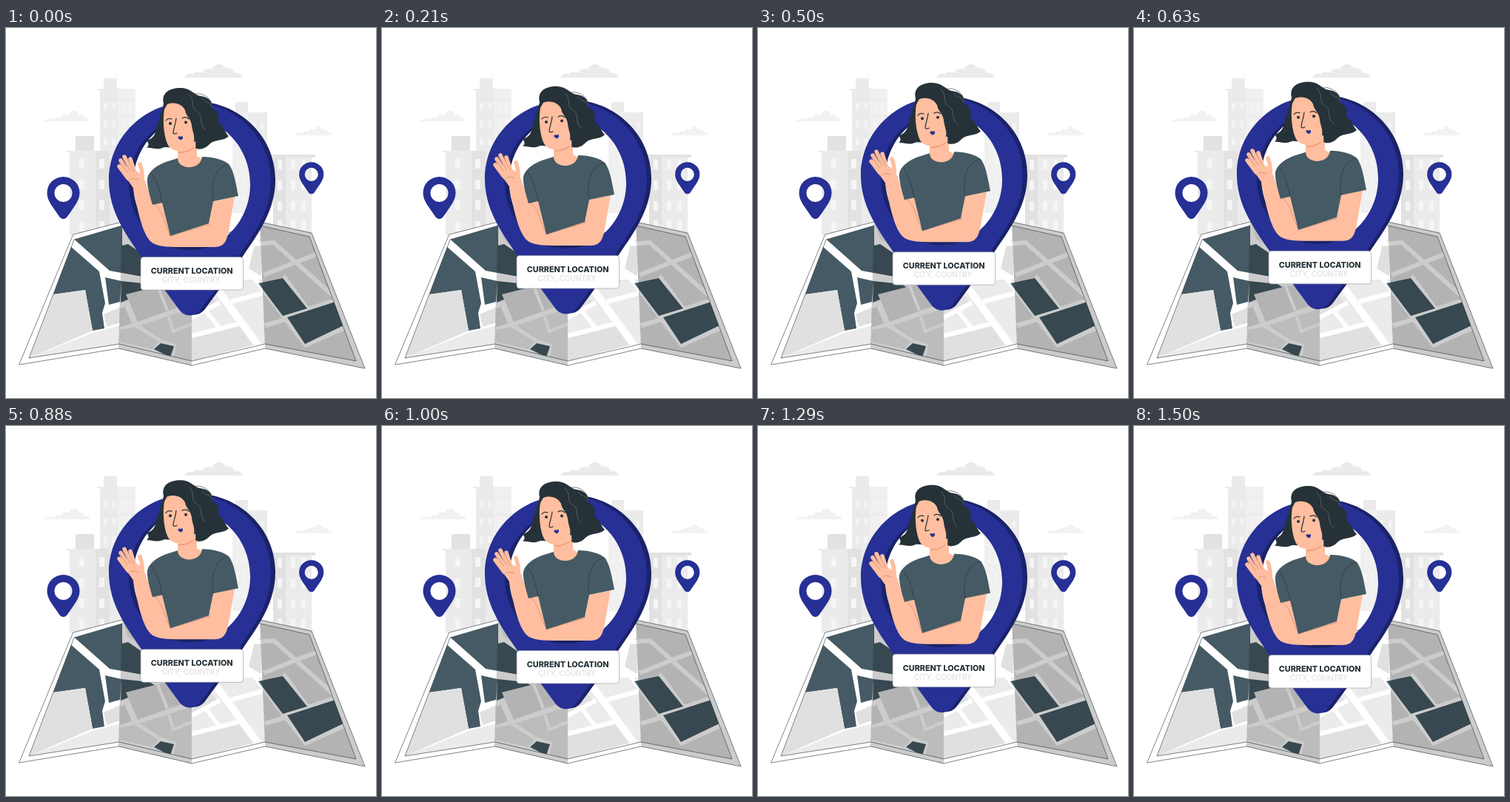
Recreate the animation shown at these times as an HTML page. Size 500x500 px, loop 1540 ms.

```html
<!DOCTYPE html>
<html lang="en">
<head>
<meta charset="utf-8">
<title>Current location</title>
<style>
html, body { margin: 0; width: 100%; height: 100%; overflow: hidden; background: #fff }
svg { display: block; width: 100vw; height: 100vh }
text { font-family: Inter, Roboto, sans-serif; text-anchor: middle }
.line { fill: none; stroke: #263238; stroke-width: .6; stroke-linecap: round; stroke-linejoin: round }
.navy { fill: #263095 }
.shade { fill: #1b2269 }
.skin { fill: #ffbe9f }
.dark { fill: #455a64 }
.road { fill: none; stroke: #fff; stroke-width: 6 }
</style>
</head>
<body>
<svg viewBox="0 0 500 500">
  <defs>
    <path id="ring" fill-rule="evenodd" d="M248.500 100C188 100 139 147 139 206C139 246 160 276 182 308L216 356L235 382Q241 388.500 248.500 388.500Q256 388.500 262 382L281 356L315 308C337 276 358 246 358 206C358 147 309 100 248.500 100ZM248 122C293 122 330 162 330 211S293 300 248 300S166 260 166 211S203 122 248 122Z"/>
    <path id="marker" fill-rule="evenodd" d="M0-21.500A22 21.500 0 0 0-22 0C-22 8-18 14-14 20L-5 33Q0 38 5 33L14 20C18 14 22 8 22 0A22 21.500 0 0 0 0-21.500ZM0-11.500A12 12 0 1 1 0 12.500A12 12 0 0 1 0-11.500Z"/>
    <clipPath id="sheet"><path d="M92 286L157 267L251 300L343 267L410 282L473 450L350 427L251 450L153 427L31 446Z"/></clipPath>
  </defs>

  <g id="clouds" fill="#ebebeb">
    <path d="M242 67C241 63 247 61 252 62C256 58 261 60 265 60C268 53 276 56 279 55C283 46 295 48 297 55C304 52 308 58 309 61C315 60 320 63 319 67Z"/>
    <path fill="#f2f2f2" d="M52 126C53 122 60 122 64 123C67 119 72 121 75 121C77 115 83 117 85 117C88 110 97 111 99 117C104 116 106 121 107 122C111 121 114 124 113 126Z"/>
    <path fill="#f2f2f2" d="M391 145C391 141 397 141 400 142C403 138 406 140 409 140C411 135 415 137 418 137C421 131 427 133 429 138C434 137 435 141 436 141C440 141 441 144 440 145Z"/>
  </g>

  <g id="city">
    <path fill="#f0f0f0" d="M123 82H176V84H175V265H127V84H123ZM304 114H353V250H306V116H304Z"/>
    <path fill="#ebebeb" d="M132 68H150V82H132ZM123 82H151V265H127V84H123ZM310 100H327V114H310ZM328 114H353V190H328Z"/>
    <path fill="#ebebeb" d="M81 166H140V168H139V280H86V168H81ZM357 171H418V175H413V280H361V175H357Z"/>
    <path fill="#e2e2e2" d="M94 146H119V166H94ZM121 166H140V270H121ZM361 175H378V265H361ZM357 171H418V175H357Z"/>
    <g id="windows"></g>
  </g>

  <path fill="#fff" d="M91 279L157 262L251 294L343 262L413 277L485 460L350 433L251 456L152 433L18 455Z"/>
  <g clip-path="url(#sheet)">
    <g id="panel1">
      <path class="dark" d="M90 284L157 265V331L140 328L95 288ZM86 294L126 329L134 372L130 385L133 406L117 409L107 354L64 360ZM134 337L156 342L154 370L139 374Z"/>
      <path fill="#e0e0e0" d="M64 360L107 354L117 409L31 446ZM132 387L155 377V398L136 404Z"/>
      <path fill="#ebebeb" d="M117 412L154 402V430L31 446Z"/>
    </g>
    <g id="panel2">
      <path class="dark" d="M165 292L184 305L190 337L157 331V294ZM156 342L194 346L202 351L160 369L155 371ZM200 434L209 426L227 430L222 445Z"/>
      <path fill="#e0e0e0" d="M162 360L205 349L251 342V371L178 397ZM154 380L160 376L170 399L154 404Z"/>
      <path fill="#ebebeb" d="M157 262L180 271L184 298L165 285ZM153 408L174 404L206 424L198 434L153 424ZM181 402L251 379V450L227 445L230 427L210 421Z"/>
      <path class="road" style="stroke-width:4" d="M205 349L218 382M220 390L226 410L251 400"/>
    </g>
    <g id="panel3">
      <path fill="#ebebeb" d="M251 340H346L350 428L251 414Z"/>
      <path fill="#e0e0e0" d="M251 414L314 398L340 427L251 450ZM251 383L278 362L288 375L251 390Z"/>
      <path class="road" d="M251 391L289 371M251 416L314 400M270 382L288 405M304 370L348 358"/>
      <path class="road" style="stroke-width:10" d="M280 346L343 432"/>
    </g>
    <g id="panel4">
      <path fill="#e0e0e0" d="M343 262H420L480 455L350 428Z"/>
      <path fill="#e0e0e0" d="M336 292L345 285V335L328 325Z"/>
      <path class="road" d="M336 292L362 290L450 369M348 334L390 317L424 304M331 332L406 430M372 392L450 366M375 335L412 386M350 402L384 392M404 429L462 403"/>
      <path class="dark" d="M341 345L374 338L407 379L374 389ZM380 391L445 370L458 401L404 427Z"/>
    </g>
  </g>
  <path opacity=".2" d="M157 262L251 294V456L152 433ZM343 262L413 277L485 460L350 433Z"/>
  <path class="line" d="M91 279L157 262L251 294L343 262L413 277L485 460L350 433L251 456L152 433L18 455Z"/>
  <path class="line" d="M343 267L410 282L473 450L350 427L251 450L153 427L31 446L92 286L157 267"/>

  <g class="navy">
    <use href="#marker" x="77.500" y="222.500"/>
    <use href="#marker" transform="translate(412.700 197.500)scale(.755)"/>
  </g>

  <g id="bob">
    <use href="#ring" class="shade" transform="translate(6 -1)"/>
    <use href="#ring" class="navy"/>
    <path class="shade" d="M200 286H298Q250 314 200 286Z"/>

    <path fill="#263238" d="M213 102C209 86 224 80 238 81C251 82 254 91 263 92C274 93 281 101 278 109C289 112 288 122 287 128C295 133 296 142 301 146C295 153 282 150 275 157C268 165 259 164 255 163L214 161C204 166 197 161 190 162C197 156 187 152 193 151C205 146 202 133 207 124C208 117 211 112 213 102Z"/>
    <path class="skin" d="M232 157L232 180C238 195 260 192 265 177L258 173V153Z"/>
    <path class="skin" d="M219 101C230 98 240 105 243 112C245 119 249 121 251 130C253 142 258 152 250 161C244 169 228 168 221 161C214 153 211 127 214 110Z"/>
    <path fill="#263238" d="M218 103C229 99 239 104 242 111C243 119 250 122 251 131C252 143 258 150 256 163L270 158L268 120L249 94L218 95Z"/>
    <path fill="none" stroke="#eb9b79" stroke-width="1.500" d="M233 168Q244 169 253 162"/>
    <g fill="#263238"><circle cx="222" cy="129" r="2"/><circle cx="243" cy="127.500" r="2"/></g>
    <path class="line" style="stroke-width:1.200" d="M216 125Q219 121 224 123M238 122Q243 119 247 123M230 122C229 131 226 137 226 142Q228 144 231 142"/>
    <path class="navy" d="M232 148Q234 145 236 147Q239 144 239 149Q237 152 235 151Z"/>
    <path class="line" style="stroke:#6e7c83" d="M247 90C257 97 248 108 258 113C268 118 259 131 270 137M265 95C269 103 278 99 278 107"/>
    <path class="line" d="M255 89Q269 87 277 99"/>

    <path class="skin" d="M172 216C178 248 184 276 195 288C203 297 225 296 250 296H282C297 296 299 285 302 268L309 227L280 231L275 261L222 281L211 234L199 238L188 207Z"/>
    <path class="skin" d="M162 202C160 195 165 191 173 192L181 196L189 208L186 217L174 219Z"/>
    <path fill="none" stroke="#ffbe9f" stroke-width="5.500" stroke-linecap="round" d="M165 203L153 187M167 200L155 179M171 198L160 174M175 199L168 177M184 208C185 198 184 192 181 184"/>
    <path class="line" style="stroke:#b97f69" d="M164 195L154 181M168 193L159 178M173 194L166 180M179 205Q172 202 168 205M200 237Q211 248 213 258L222 281L275 265"/>
    <path class="dark" d="M232 176C232 192 263 193 265 174C281 174 295 178 302 185C309 196 311 213 314 227L280 234L274 264L222 281L211 236L198 239C194 226 190 211 191 203C193 193 205 185 216 181Z"/>
    <path class="line" d="M280 234C277 215 279 190 300 184M211 236Q207 211 197 197"/>

    <rect class="line" style="fill:#fff;stroke:#8d959b" x="182" y="309.500" width="138.500" height="44.500" rx="4"/>
    <text x="251.200" y="332" font-size="10.800" font-weight="800" fill="#263238">CURRENT LOCATION</text>
    <text x="250" y="344" font-size="10" font-weight="500" fill="#e0e0e0">CITY, COUNTRY</text>
  </g>
</svg>
<script>
const LOOP = 1540, STEPS = 37, LIFT = 8.6;
const bob = document.getElementById('bob');

function addWindows(columns, rows, width, height, fill) {
  const d = columns.flatMap(x => rows.map(y => `M${x} ${y}h${width}v${height}h${-width}z`)).join('');
  document.getElementById('windows').innerHTML += `<path fill="${fill}" d="${d}"/>`;
}
addWindows([99, 126], [177, 205, 233, 261], 7, 13, '#f5f5f5');
addWindows([367, 385, 399], [178, 206, 234, 260], 6, 13, '#f5f5f5');
addWindows([132, 143, 156, 166], [101, 125, 149], 5, 9, '#f3f3f3');
addWindows([311, 320, 333, 344], [128, 152, 176, 200, 224], 4, 9, '#f4f4f4');
addWindows([127], [96, 119, 143], 48, 1, '#e6e6e6');

function draw(now) {
  const step = Math.floor((now + 2) % LOOP / LOOP * STEPS);
  const phase = 2 * Math.PI * (step / STEPS + 50 / LOOP);
  const y = .1 - LIFT * (1 - Math.cos(phase)) / 2;
  bob.setAttribute('transform', `translate(0 ${y.toFixed(3)})`);
  requestAnimationFrame(draw);
}
draw(performance.now());
</script>
</body>
</html>
```
